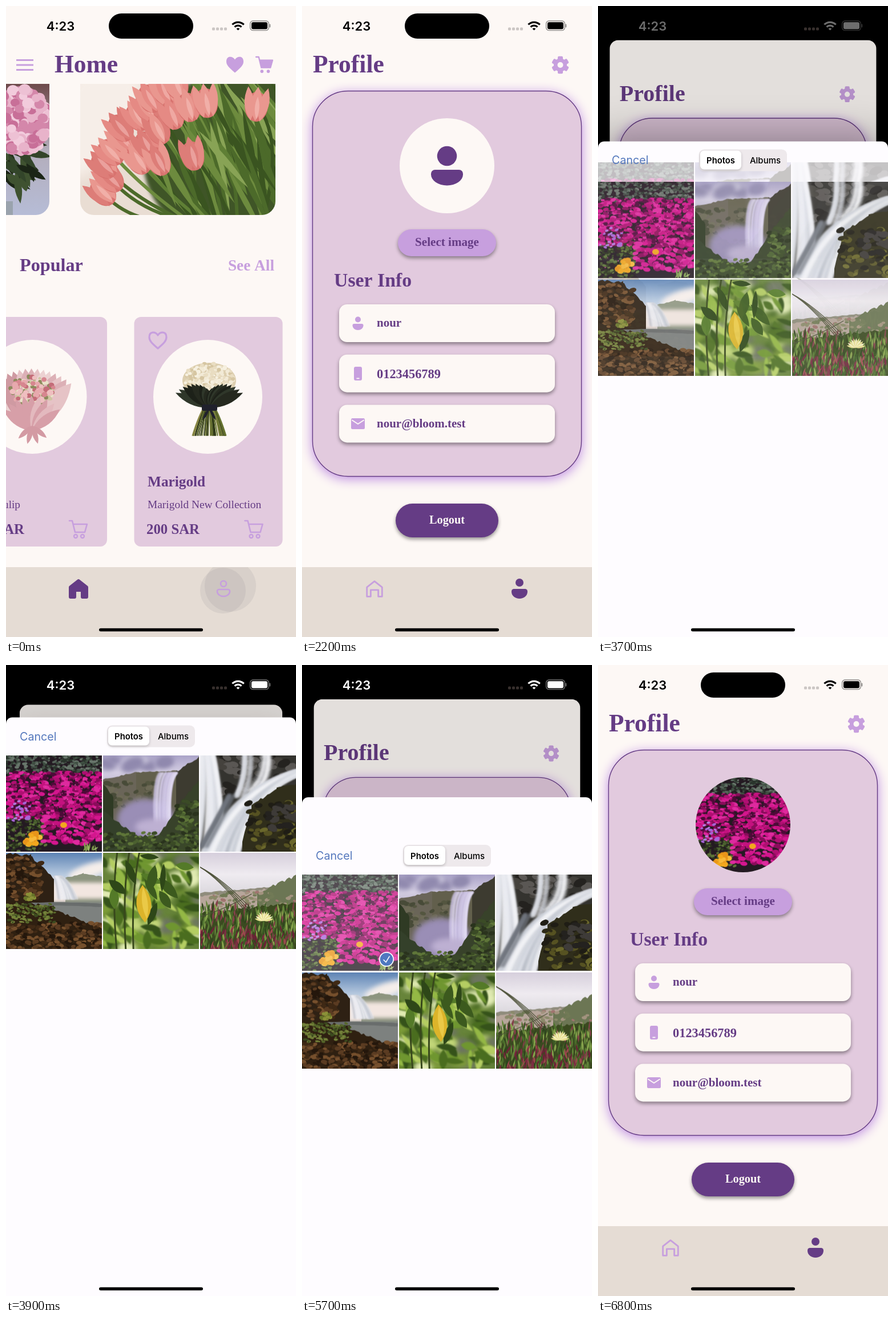
Recreate the animation shown at these times as an HTML page with a canvas. Size 508 by 1102 pixels, loop 8000 ms.

```html
<!DOCTYPE html>
<html lang="en">
<head>
<meta charset="utf-8">
<title>Flower shop profile</title>
<style>
html, body { margin: 0; width: 508px; height: 1102px; overflow: hidden; background: #fdf8f5; }
canvas { display: block; }
</style>
</head>
<body>
<canvas id="stage" width="508" height="1102"></canvas>
<script>
const W = 508, H = 1102, LOOP = 8000, TILE = 168;
const CREAM = '#fdf8f5', PLUM = '#653c85', LILAC = '#c79fde', PINK = '#e2cade', SAND = '#e5dcd4';
const SERIF = '"Liberation Serif", serif', SANS = 'Inter, sans-serif';
const stage = document.getElementById('stage').getContext('2d');
let c = stage;

const clamp = v => Math.max(0, Math.min(1, v));

// Drawing helpers: a line width draws an outline, otherwise the shape is filled
function paint(color, line) {
  c.fillStyle = c.strokeStyle = color;
  c.lineWidth = line || 1;
  c.lineCap = c.lineJoin = 'round';
  if (line) c.stroke();
  else c.fill();
}
function box(color, x, y, w, h, r = 0, line) {
  c.beginPath();
  c.roundRect(x, y, w, h, r);
  paint(color, line);
}
function oval(color, x, y, rx, ry = rx, turn = 0, line) {
  c.beginPath();
  c.ellipse(x, y, rx, ry, turn, 0, 7);
  paint(color, line);
}
function path(color, d, line) {
  c.strokeStyle = c.fillStyle = color;
  c.lineWidth = line || 1;
  c.lineCap = c.lineJoin = 'round';
  if (line) c.stroke(new Path2D(d));
  else c.fill(new Path2D(d));
}
function text(s, x, y, size, color = PLUM, weight = 700, family = SERIF, align = 'left') {
  c.font = `${weight} ${size}px ${family}`;
  c.textAlign = align;
  c.fillStyle = color;
  c.fillText(s, x, y);
}
function local(draw) { c.save(); draw(); c.restore(); }
function at(x, y, scale, draw) {
  local(() => { c.translate(x, y); c.scale(scale, scale); draw(); });
}
function shaded(color, blur, dy, draw) {
  local(() => {
    c.shadowColor = color;
    c.shadowBlur = blur;
    c.shadowOffsetY = dy;
    draw();
  });
}
function blurred(px, draw) {
  local(() => { c.filter = `blur(${px}px)`; draw(); });
}
function clipped(x, y, w, h, r, draw) {
  local(() => {
    c.beginPath();
    c.roundRect(x, y, w, h, r);
    c.clip();
    draw();
  });
}
function fade(h, ...colors) {
  const g = c.createLinearGradient(0, 0, 0, h);
  colors.forEach((color, i) => g.addColorStop(i / (colors.length - 1), color));
  return g;
}

// Seeded natural textures
let seed = 7;
const rnd = (a, b) => a + (b - a) * ((seed = seed * 16807 % 2147483647) / 2147483647);
const pick = list => list[Math.floor(rnd(0, list.length))];
function repeat(n, draw) { for (let i = 0; i < n; i++) draw(i, n > 1 ? i / (n - 1) : 0); }
function blobs(n, colors, x, y, w, h, size) {
  repeat(n, () => {
    const r = rnd(size * .5, size);
    oval(pick(colors), rnd(x, x + w), rnd(y, y + h), r, r * .6, rnd(-.5, .5));
  });
}
function cluster(n, colors, x, y, rx, ry, size) {
  repeat(n, () => {
    const a = rnd(0, 6.28), d = Math.sqrt(rnd(0, 1)), r = rnd(size * .6, size);
    oval(pick(colors), x + rx * d * Math.cos(a), y + ry * d * Math.sin(a), r, r * .9);
  });
}
function ridge(color, x0, y0, x1, y1, rough = 5) {
  c.beginPath();
  c.moveTo(x0, TILE);
  for (let x = x0; x <= x1; x += 4)
    c.lineTo(x, y0 + (y1 - y0) * (x - x0) / (x1 - x0) + rnd(-rough, rough) / 2);
  c.lineTo(x1, y1);
  c.lineTo(x1, TILE);
  paint(color);
}
// Curves from (x0, y0) to (x1, y1) past (cx, cy), fanned out by s0 and s1
function strands(n, colors, width, x0, y0, s0, cx, cy, x1, y1, s1) {
  repeat(n, () => {
    const u = rnd(-1, 1);
    c.beginPath();
    c.moveTo(x0 + u * s0, y0);
    c.quadraticCurveTo(cx + u * (s0 + s1) / 2, cy, x1 + u * s1, y1);
    paint(pick(colors), width);
  });
}
function leaf(color, x, y, length, width, turn) {
  at(x, y, 1, () => {
    c.rotate(turn);
    c.beginPath();
    c.moveTo(0, 0);
    c.quadraticCurveTo(length / 2, -width, length, 0);
    c.quadraticCurveTo(length / 2, width, 0, 0);
    paint(color);
  });
}
function leaves(n, colors, x, y, w, h, length, width, turn, sway) {
  repeat(n, () => leaf(pick(colors), rnd(x, x + w), rnd(y, y + h),
    rnd(length * .5, length), rnd(width * .5, width), turn + rnd(-sway, sway)));
}

// Simplified pictures
function picture(w, h, draw) {
  const cv = document.createElement('canvas');
  cv.width = w;
  cv.height = h;
  c = cv.getContext('2d');
  draw();
  c = stage;
  return cv;
}
const MAGENTA = ['#c4127f', '#d4168e', '#b00f72', '#de2a9e', '#8a0c5b', '#4d0b38'];
const MOSS = ['#4c6130', '#3b4b26', '#2a331d', '#5f7639'];
const EARTH = ['#5b3c22', '#3f2915', '#24170c', '#76502d'];
const LEAF = ['#4a6d1f', '#6f9630', '#94b845', '#b4cd62', '#35521a'];
const MIST = ['rgba(222,214,242,.5)', 'rgba(190,178,222,.5)', 'rgba(240,236,250,.4)'];
const FOAM = ['rgba(236,237,242,.7)', 'rgba(196,200,210,.6)', 'rgba(250,250,252,.6)'];
const GREENS = ['#4c6a2a', '#6d8b3e', '#3a5420', '#88a355', '#5f7f35'];

function magentaField() {
  box('#241a22', 0, 0, TILE, TILE);
  blobs(300, ['#3f4f42', '#56655a', '#2a352c', '#69776c'], 0, 0, TILE, 34, 4);
  blobs(200, MOSS, 0, 95, 70, 73, 4);
  blobs(620, MAGENTA, 0, 30, TILE, 80, 6);
  blobs(180, MAGENTA, 65, 100, 103, 55, 7);
  blobs(60, ['#f05cba', '#e84cb0'], 0, 40, TILE, 110, 1.5);
  blobs(20, ['#a865d8', '#b77be0'], 0, 78, 42, 36, 5);
  cluster(18, ['#f2a81e', '#f7b93a', '#e8951a'], 47, 146, 16, 11, 6);
  oval('#f2a81e', 101, 122, 6, 5);
  leaves(10, ['#9dbb6a', '#7c9a4a'], 125, 166, 40, 4, 16, 4, -1.2, .7);
}
function mistyFalls() {
  box(fade(60, '#aaa3c8', '#d6d0e4', '#b3aac6'), 0, 0, TILE, TILE);
  blurred(4, () => blobs(10, ['#9089ae', '#cfcbe0'], 0, 0, 120, 24, 22));
  ridge('#6a6558', 0, 42, 60, 30, 3);
  ridge('#625f4c', 58, 30, 130, 27, 2);
  ridge('#3d3b30', 128, 28, TILE, 4);
  blobs(70, ['#545640', '#6d6a56', '#484b38'], 0, 44, 92, 50, 7);
  blurred(5, () => oval('#9a8eb6', 75, 112, 50, 36));
  blurred(1, () => strands(50, MIST, 3, 114, 31, 16, 100, 45, 104, 128, 14));
  blurred(5, () => oval('#bdb0d2', 90, 125, 34, 14));
  ridge('#38422a', 98, 140, 140, 76);
  ridge('#38422a', 138, 78, TILE, 45);
  blobs(70, MOSS, 128, 80, 40, 70, 7);
  ridge('#2f3a24', 0, 48, 18, 74);
  ridge('#34402a', 0, 98, 60, 142);
  ridge('#3a472a', 30, 140, TILE, 142);
  blobs(150, MOSS, 0, 135, TILE, 33, 5);
}
function rockyFalls() {
  box('#34332f', 0, 0, TILE, TILE);
  blobs(60, ['#24221f', '#45423d', '#5a5754'], 25, 0, 140, 70, 12);
  blurred(2, () => {
    strands(45, FOAM, 7, 8, -4, 14, 14, 80, 0, 172, 40);
    strands(16, FOAM, 3, 82, -4, 10, 84, 40, 68, 72, 12);
    strands(16, FOAM, 3, 116, -4, 8, 118, 40, 92, 62, 14);
    strands(60, FOAM, 6, 172, 30, 6, 72, 62, 34, 174, 32);
  });
  blurred(2, () => strands(8, ['#70757e'], 3, 54, 70, 6, 40, 100, 6, 160, 8));
  ridge('#302e1b', 74, 150, 92, 86);
  ridge('#302e1b', 90, 88, 136, 56);
  ridge('#302e1b', 134, 58, TILE, 50);
  blobs(90, ['#565222', '#6a672b', '#2c2916', '#1f1d15'], 84, 80, 90, 86, 8);
  blobs(25, ['#24221f', '#3e3b38'], 120, 88, 50, 40, 10);
}
function brownFalls() {
  box(fade(78, '#5d83b4', '#b9cbe0', '#f0e4dd'), 0, 0, TILE, TILE);
  blurred(4, () => oval('#f5eeea', 150, 30, 42, 12, -.3));
  ridge('#8d957f', 104, 44, 136, 36, 2);
  ridge('#8d957f', 134, 36, TILE, 42, 2);
  blurred(3, () => box('#f2e6e0', 78, 52, 100, 28));
  blurred(1, () => strands(40, FOAM, 3, 90, 42, 8, 98, 48, 106, 80, 20));
  blurred(2, () => box('#7d817f', 30, 86, 150, 60));
  ridge('#2e2114', 0, 2, 44, 4);
  ridge('#2e2114', 42, 4, 84, 46);
  blobs(110, EARTH, 0, 8, 62, 74, 7);
  strands(16, ['#848784', '#696d6c'], 5, 60, 90, 20, 100, 88, TILE, 92, 10);
  ridge('#2f2011', 0, 84, 70, 92);
  ridge('#2f2011', 68, 92, TILE, 132);
  blobs(260, EARTH, 0, 122, TILE, 46, 6);
  blobs(130, ['#56662a', '#74813a', '#3b4a1f'], 2, 88, 85, 34, 4);
  cluster(16, ['#8b9138', '#667328'], 42, 78, 8, 7, 4);
}
function greenLeaves() {
  box('#67843a', 0, 0, TILE, TILE);
  blurred(4, () => blobs(80, ['#c3d77a', '#e2ecb4', '#4a6a24', '#7d9c38', '#6d7560'], 0, 0, TILE, TILE, 20));
  blurred(1, () => leaves(80, LEAF, -15, -15, 170, 170, 46, 16, .9, .9));
  strands(3, ['#38481c'], 3, 60, -5, 40, 45, 70, 50, 172, 30);
  leaves(12, ['#2e4718', '#3c5a1e', '#547a28'], 10, 0, 120, 90, 56, 17, 1, 1);
  leaf('#dcb42a', 69, 56, 66, 26, 1.5);
  leaf('#eac947', 70, 60, 56, 10, 1.45);
}
function dunes() {
  box(fade(75, '#d6cfdc', '#efebf0', '#d9d6dc'), 0, 0, TILE, TILE);
  ridge('#8f8c7c', 0, 70, TILE, 56, 2);
  ridge('#b7a69b', 0, 76, TILE, 58);
  ridge('#6c7654', 100, 70, TILE, 40);
  blobs(60, ['#a3937f', '#8b8a6a', '#717a56', '#a0746f'], 20, 68, 148, 26, 5);
  ridge('#3b4a20', 0, 104, TILE, 88);
  leaves(420, ['#63863a', '#86a24c', '#3c5a25', '#4d6e2c', '#2f451d', '#84404a'], 0, 100, TILE, 80, 22, 4, -1.55, .3);
  leaves(90, ['#7c2f42', '#6b2236', '#9a4a4c'], 0, 140, TILE, 40, 18, 4, -1.5, .5);
  strands(4, ['#4d5138'], 1.2, 0, 25, 0, 30, 45, 72, 100, 22);
  strands(1, ['#4d5138'], 1.2, 0, 112, 0, 50, 96, 90, 72, 0);
  repeat(11, (i, u) => leaf(i % 2 ? '#f6f2c0' : '#e8df90', 112, 119, 17, 4, -2.9 + u * 2.7));
}
const photos = [magentaField, mistyFalls, rockyFalls, brownFalls, greenLeaves, dunes]
  .map(draw => picture(TILE, TILE, draw));

function tulip(x, y, turn) {
  at(x, y, 1, () => {
    c.rotate(turn);
    oval('#d8736f', 0, 4, 20, 26);
    for (const side of [-1, 1, 0])
      leaf(pick(['#e58a84', '#e9978f', '#dd7d78']), side * 8, 29, 60, side ? 17 : 20, -1.57 + side * .16);
    leaf('rgba(250,205,200,.45)', 2, 26, 40, 8, -1.6);
  });
}
const tulips = picture(342, 229, () => {
  box('#e9ddd3', 0, 0, 342, 229);
  blurred(12, () => oval('#f6eee8', 20, 60, 70, 120, .6));
  blurred(3, () => oval('#3f5527', 270, 130, 160, 150));
  const heads = [];
  repeat(11, (i, u) => heads.push([255 + rnd(205, 232) * Math.cos(3.2 + u * 1.1), 200 + 220 * Math.sin(3.2 + u * 1.1)]));
  repeat(6, (i, u) => heads.push([255 + 165 * Math.cos(3.5 + u), 190 + rnd(155, 170) * Math.sin(3.5 + u)]));
  heads.push([136, 132], [196, 122], [309, 36]);
  leaves(60, GREENS, 150, -30, 180, 130, 210, 16, 1.15, .35);
  for (const [x, y] of heads) strands(1, GREENS, 6, x, y, 0, x + 50, y + 60, x * .5 + 165, 240, 0);
  leaves(14, GREENS, 110, 60, 200, 90, 190, 15, 1.1, .3);
  for (const [x, y] of heads) tulip(x, y, x > 250 ? .1 : -.9 + x / 300);
});
const peony = picture(76, 229, () => {
  box(fade(229, '#6e4a4b', '#b3adbb', '#b6bcd6'), 0, 0, 76, 229);
  leaves(26, ['#24311b', '#3f5230', '#1b2516', '#33452a'], -20, 100, 60, 60, 60, 16, .9, .8);
  box('#9aa3ad', 0, 205, 12, 24);
  oval('#cf86a9', 26, 64, 52, 60);
  cluster(220, ['#e8b3ca', '#d487aa', '#f2cbdc', '#c86f98', '#edc1d4'], 26, 64, 50, 56, 11);
});
const bouquets = picture(W, H, () => {
  repeat(15, (i, u) => leaf(pick(['#e6c3c6', '#dcb0b6', '#cf9aa2', '#ecd2d2']), 45, 738, 105, 34, -2.3 + u * 1.45));
  cluster(110, ['#e9e1c8', '#cfc5a2', '#8c8a5c'], 46, 672, 40, 26, 4);
  cluster(45, ['#d7868f', '#e7a9ad', '#c46c78', '#efbfc0'], 46, 672, 38, 24, 6);
  repeat(9, (i, u) => leaf(pick(['#e3b9be', '#d79fa8']), 45, 742, 62, 17, -2.5 + u * 1.85));
  repeat(4, (i, u) => leaf('#d39aa3', 46, 733, 33, 9, .7 + u * 1.7));

  strands(60, ['#6d7a35', '#2c3517', '#8d8a48', '#4a5522'], 1.6, 356, 698, 8, 356, 715, 356, 750, 30);
  oval('#ddcfb0', 356, 654, 47, 31);
  cluster(260, ['#f2ead6', '#d6c6a2', '#e9ddc2', '#f6f0e0'], 356, 652, 44, 28, 4);
  repeat(19, (i, u) => {
    const a = -2.72 + u * 2.3;
    leaf(pick(['#25291f', '#2f372a', '#1d2119']), 356, 702, 30 + 38 * Math.abs(Math.cos(a)), 15, a);
  });
  box('#20212c', 343, 696, 27, 11, 3);
  for (const side of [-1, 1]) leaf('#20212c', 356, 702, 24, 5, 1.57 + side * .5);
});

// Icons, centred on their position
function heart(x, y, line) {
  at(x, y, 1, () => path(LILAC, 'M0 13.5C-11 4-15 0-15-6C-15-17-4-16 0-9.500C4-16 15-17 15-6C15 0 11 4 0 13.500Z', line));
}
function house(scale, solid) {
  at(127, 1018, scale, () => {
    const d = 'M-14-3L0-14 14-3V14H7V2H-7V14H-14Z';
    if (solid) path(PLUM, d);
    path(solid ? PLUM : LILAC, d, solid ? 6 : 3);
  });
}
function person(color, x, y, r, w, top, h, line) {
  const k = h * .25, curve = { x: w / 2, y: h * .7 };
  oval(color, x, y, r, r, 0, line);
  box(color, x - w / 2, top, w, h, [k, k, curve, curve], line);
}
function cart(x, y, scale, solid) {
  at(x, y, scale, () => {
    path(LILAC, 'M-15-15h5L-5 5H12L16-9H-8', 2.6);
    if (solid) path(LILAC, 'M-5 5H12L16-9H-8Z');
    for (const wheel of [-4, 8]) oval(LILAC, wheel, 12, 3, 3, 0, solid ? 0 : 2.4);
  });
}
function gear() {
  at(452.5, 103, 1, () => {
    repeat(6, () => {
      box(LILAC, -4.5, -15.2, 9, 12, 2);
      c.rotate(Math.PI / 3);
    });
    oval(LILAC, 0, 0, 11.5);
    oval(CREAM, 0, 0, 5);
  });
}

// Screens
function nav(home, ripple) {
  box(SAND, 0, 980, W, 122);
  clipped(0, 980, W, 122, 0, () => {
    const ink = `rgba(90,90,100,${.09 * (1 - ripple)})`;
    oval(ink, 380, 1021, 40 + 40 * ripple);
    oval(ink, 393, 1013, 45 + 40 * ripple);
  });
  house(home ? 1 : .95, home);
  if (home) person(LILAC, 381, 1009, 5, 22, 1019, 12, 2.6);
  else person(PLUM, 381, 1007, 7, 28, 1018, 17);
}
function product(x) {
  box(PINK, x, 543, 260, 401, 12);
  oval(CREAM, x + 129, 682.5, 95.5, 99.5);
  cart(x + 209, 914, 1);
}
function home(ripple) {
  box(CREAM, 0, 0, W, H);
  repeat(3, i => box(LILAC, 18, 93 + 8.5 * i, 30, 3));
  text('Home', 85, 116, 43.5);
  heart(401, 103);
  cart(452, 103, .93, true);
  clipped(-50, 100, 126, 265, 24, () => c.drawImage(peony, 0, 136));
  clipped(130, 100, 342, 265, 24, () => c.drawImage(tulips, 130, 136));
  text('Popular', 24, 463, 32.2);
  text('See All', 470, 462, 27.3, LILAC, 700, SERIF, 'right');
  product(-83);
  product(224.5);
  c.drawImage(bouquets, 0, 0);
  heart(266, 584.5, 3.2);
  text('Pink Tulip', 25, 877, 19.3, PLUM, 400, SERIF, 'right');
  text('150 SAR', 32, 922, 24.8, PLUM, 700, SERIF, 'right');
  text('Marigold', 248, 839, 25.3);
  text('Marigold New Collection', 248, 877, 19.4, PLUM, 400);
  text('200 SAR', 246, 922, 24.8);
  nav(true, ripple);
}
function profile(ripple, chosen) {
  const raised = (...args) => shaded('rgba(0,0,0,.4)', 6, 3.5, () => box(...args));
  box(CREAM, 0, 0, W, H);
  text('Profile', 19, 116, 43.5);
  gear();
  shaded('#bd8be0', 20, 4, () => box(PINK, 18, 148, 472, 674, 62));
  box(PLUM, 18.5, 148.5, 471, 673, 62, 1.4);
  oval(CREAM, 254, 279, 83);
  if (chosen) clipped(171, 196, 166, 166, 83, () => c.drawImage(photos[0], 171, 196, 166, 166));
  else person(PLUM, 254, 262, 17.3, 56, 286, 27.5);
  raised(LILAC, 168, 390, 172, 47, 23.5);
  text('Select image', 254, 419, 21.1, PLUM, 700, SERIF, 'center');
  text('User Info', 56, 490, 33.8);
  repeat(3, i => raised(CREAM, 65, 521 + 87.7 * i, 378, 66, 14));
  person(LILAC, 98, 547.5, 5, 19, 555, 11);
  box(LILAC, 91, 630, 14, 24, 3);
  box(CREAM, 95.5, 649.5, 5, 1.8);
  box(LILAC, 86, 720, 24, 19, 2.5);
  path(CREAM, 'M88 723.5l10 6.500 10-6.500', 2);
  text('nour', 131, 560, 21);
  text('0123456789', 131, 650, 22.4);
  text('nour@bloom.test', 131, 736, 21);
  raised(PLUM, 164, 869, 180, 59, 29.5);
  text('Logout', 254, 904, 20.3, CREAM, 700, SERIF, 'center');
  nav(false, ripple);
}
function grid(y, alpha) {
  local(() => {
    c.globalAlpha = alpha;
    photos.forEach((img, i) => c.drawImage(img, i % 3 * 170, y + Math.floor(i / 3) * 170.5));
  });
}
function picker(top, closing, fresh) {
  const shade = closing ? 0 : .15 + .2 * fresh;
  shaded(`rgba(0,0,0,${shade})`, 70, -4, () => box('#fefcff', 0, top, W, H + 20, 11));
  const y = top + (closing ? 69 : 0);
  if (fresh) grid(y + 37, .28 * fresh);
  grid(y + 66 + 5 * fresh, 1 - .12 * fresh);
  if (closing) {
    box('rgba(255,255,255,.22)', 0, y + 66, TILE, TILE);
    oval('#fff', 148, y + 214, 13);
    oval('#4f78c0', 148, y + 214, 11.3);
    path('#fff', `M143 ${y + 215}l4 4 6-10`, 1.6);
  }
  text('Cancel', 24, y + 40, 19.7, '#5578bd', 400, SANS);
  box('#eee9ec', 177, y + 14, 154, 38, 9);
  shaded('rgba(0,0,0,.2)', 5, 2, () => box('#fff', 179, y + 16, 72, 33, 7));
  text('Photos', 215, y + 38.5, 14.8, '#000', 600, SANS, 'center');
  text('Albums', 293, y + 38.5, 15, '#000', 500, SANS, 'center');
}
function status(light, dark) {
  const v = Math.round(255 * light), ink = `rgb(${v},${v},${v})`;
  box('#000', 180, 13, 148, 44, 22);
  text('4:23', 95.5, 42.5, 22, ink, 600, SANS, 'center');
  repeat(4, i => box(dark ? '#38302e' : '#cbc6c4', 361 + i * 7, 37.5, 5, 5, 1.5));
  c.strokeStyle = ink;
  c.lineCap = 'butt';
  for (const r of [2, 8.4, 14.2]) {
    c.lineWidth = r > 2 ? 3.2 : 4;
    c.beginPath();
    c.arc(406.5, 42.5, r, -2.36, -.78);
    c.stroke();
  }
  local(() => {
    c.globalAlpha = .45;
    box(ink, 427.7, 26, 32.6, 16.6, 5, 1.4);
    box(ink, 461.5, 31.5, 1.8, 6, 1);
  });
  box(ink, 430, 28.2, 28, 12.2, 3);
}

// Critically damped spring, 0 to 1, over elapsed ms
function spring(ms) {
  const x = Math.max(0, ms) * .0168;
  return 1 - (1 + x) * Math.exp(-x);
}
function sheetOpen(t) {
  if (t < 4100) return spring(t - 3500);
  if (t < 5700) return 1;
  return t < 6200 ? 1 - spring(t - 5660) : 0;
}

function draw(t) {
  const open = sheetOpen(t), closing = t >= 5700, ripple = clamp(t / 500);
  if (t < 100) home(ripple);
  else if (!open) profile(ripple, t >= 6800);
  else {
    const s = 1 - .0945 * open;
    box('#000', 0, 0, W, H);
    local(() => {
      c.translate(W / 2 * (1 - s), 70 * open);
      c.scale(s, s);
      clipped(0, 0, W, H, 17, () => {
        profile(1, false);
        box(`rgba(0,0,0,${.12 * open})`, 0, 0, W, H);
      });
    });
    picker(H - 1020 * open, closing, closing ? 0 : clamp((3900 - t) / 200));
  }
  const light = closing ? 1 - (t - 5700) / 300 : (t - 3550) / 350;
  status(open ? clamp(light) : 0, open > .5);
  box('#000', 163, 1086.7, 182, 5.6, 2.8);
}

// The picture advances ten times a second
let shown = -1;
function tick() {
  const t = Math.floor(performance.now() % LOOP / 100 + .01) * 100;
  if (t !== shown) draw(shown = t);
  requestAnimationFrame(tick);
}
tick();
</script>
</body>
</html>
```
